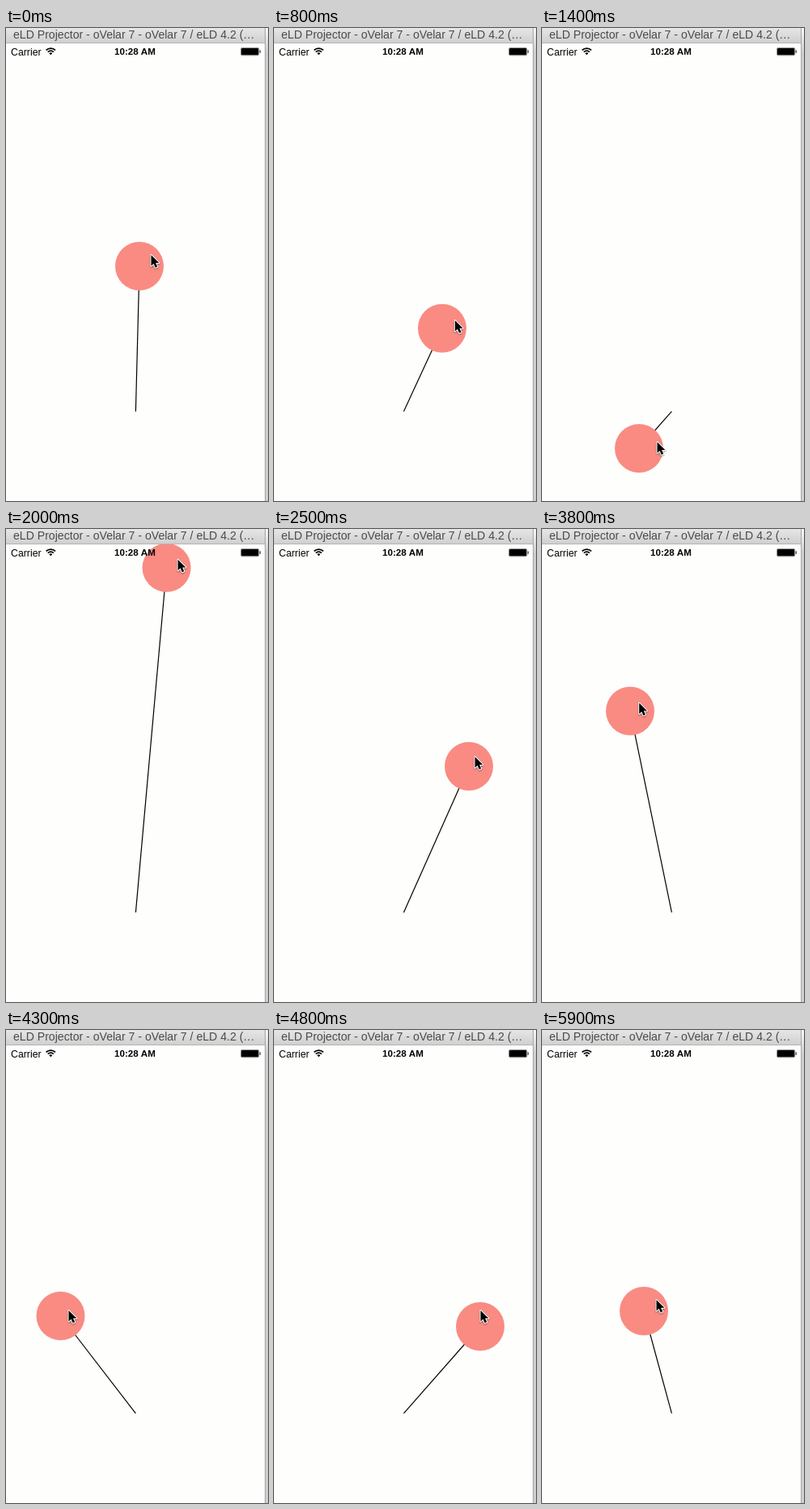
Write an HTML page with a canvas that moves like this. It is 324x584 px and loops after 6 s.

```html
<!DOCTYPE html>
<html lang="en">
<head>
<meta charset="utf-8">
<title>Ball on a spring</title>
<style>
html, body { margin: 0; width: 100%; height: 100%; overflow: hidden; background: #fefefd; }
canvas { display: block; }
</style>
</head>
<body>
<canvas id="stage" width="324" height="584"></canvas>
<script>
const ctx = document.getElementById('stage').getContext('2d');
const TICK = 100, TICKS = 60;
const ANCHOR = { x: 160.4, y: 473.4 };
const SANS = '"Liberation Sans", Arial, sans-serif';

// Each drag starts at a ball position, with the pointer held at an offset (grip).
// On the way to the next one the ball is pulled up by lift and sideways by sway.
const DRAGS = [
  { tick: 0, ball: [165, 294], grip: [14, -14], lift: 270, sway: 40 },
  { tick: 7, ball: [180, 362], grip: [15, -10], lift: 0, sway: 40 },
  { tick: 14, ball: [120, 519], grip: [22, -8], lift: 350, sway: -35 },
  { tick: 25, ball: [241, 293], grip: [7, -12], lift: 150, sway: -75 },
  { tick: 33, ball: [110.5, 111], grip: [17.5, -22], lift: 0, sway: 0 },
  { tick: 35, ball: [101, 193], grip: [11, -11], lift: 0, sway: 0 },
  { tick: 36, ball: [101, 193], grip: [11, -11], lift: 0, sway: 15 },
  { tick: 43, ball: [67.5, 353], grip: [9.5, -7], lift: 300, sway: -20 },
  { tick: 48, ball: [255, 366], grip: [0, -20], lift: 290, sway: 25 },
  { tick: 57, ball: [126, 347], grip: [-70, -333], lift: 0, sway: 0 },
  { tick: 59, ball: [126, 347], grip: [15, -14], lift: 0, sway: 0 }
];

const mix = (a, b, u) => a.map((v, i) => v + (b[i] - v) * u);

function poseAt(tick) {
  const i = DRAGS.findLastIndex(drag => drag.tick <= tick);
  const from = DRAGS[i], to = DRAGS[i + 1] ?? { ...DRAGS[0], tick: TICKS };
  const u = (tick - from.tick) / (to.tick - from.tick);
  const ease = u * u * (3 - 2 * u);
  const [baseX, baseY] = mix(from.ball, to.ball, ease);
  const [gripX, gripY] = mix(from.grip, to.grip, ease);
  const x = baseX + from.sway * Math.sin(2 * Math.PI * u);
  const y = baseY - from.lift * Math.sin(Math.PI * u) ** 2;
  return { ball: { x, y }, pointer: { x: x + gripX, y: y + gripY } };
}

function rect(color, x, y, w, h) {
  ctx.fillStyle = color;
  ctx.fillRect(x, y, w, h);
}

function text(str, x, y, font, color) {
  ctx.font = `${font} ${SANS}`;
  ctx.fillStyle = color;
  ctx.fillText(str, x, y);
}

function fade(height, top, bottom) {
  const gradient = ctx.createLinearGradient(0, 0, 0, height);
  gradient.addColorStop(0, top);
  gradient.addColorStop(1, bottom);
  return gradient;
}

function drawBall({ x, y }) {
  ctx.strokeStyle = '#000';
  ctx.lineWidth = 1.2;
  ctx.beginPath();
  ctx.moveTo(ANCHOR.x, ANCHOR.y);
  ctx.lineTo(x, y);
  ctx.stroke();
  ctx.fillStyle = '#f98b83';
  ctx.beginPath();
  ctx.arc(x, y, 30, 0, Math.PI * 2);
  ctx.fill();
}

function drawWifi(x, y) {
  const from = -Math.PI * 0.75, to = -Math.PI * 0.25;
  ctx.strokeStyle = ctx.fillStyle = '#000';
  ctx.lineWidth = 1.7;
  for (const r of [5, 8.1]) {
    ctx.beginPath();
    ctx.arc(x, y, r, from, to);
    ctx.stroke();
  }
  ctx.beginPath();
  ctx.moveTo(x, y);
  ctx.arc(x, y, 2.8, from, to);
  ctx.fill();
}

function drawBattery() {
  ctx.strokeStyle = '#777';
  ctx.lineWidth = 0.8;
  ctx.beginPath();
  ctx.roundRect(290.4, 24.4, 22.4, 9.4, 1.8);
  ctx.stroke();
  ctx.fillStyle = '#000';
  ctx.beginPath();
  ctx.roundRect(291, 25, 21.2, 8.2, 1);
  ctx.fill();
  rect('#333', 313.6, 27.4, 1.2, 3.4);
}

function drawStatusBar() {
  text('Carrier', 6, 33.5, '12.3px', '#000');
  drawWifi(55.3, 33.2);
  text('10:28 AM', 134, 33.2, 'bold 11.6px', '#000');
  drawBattery();
}

function drawWindow() {
  rect(fade(18, '#e6e6e6', '#d0d0d0'), 0, 0, 320, 18);
  rect('#b4b4b4', 0, 18, 320, 1);
  text('eLD Projector - oVelar 7 - oVelar 7 / eLD 4.2 (…', 9, 13, '14.1px', '#4b4b4b');
  rect('#a6a6a6', 320, 0, 1, 584);
  rect(fade(30, '#f8f8f8', '#cfcfcf'), 321, 0, 3, 584);
}

function drawPointer({ x, y }) {
  ctx.save();
  ctx.translate(x + 0.5, y + 0.2);
  const arrow = new Path2D('M0 0V13.6L3.1 10.7L5.2 15.6L7.7 14.6L5.6 9.8H9.8Z');
  ctx.lineJoin = 'round';
  ctx.lineWidth = 2;
  ctx.strokeStyle = '#fff';
  ctx.shadowColor = 'rgba(0,0,0,.4)';
  ctx.shadowBlur = 2;
  ctx.shadowOffsetY = 1;
  ctx.stroke(arrow);
  ctx.shadowColor = 'transparent';
  ctx.fillStyle = '#000';
  ctx.fill(arrow);
  ctx.restore();
}

function draw(time) {
  const { ball, pointer } = poseAt(Math.floor(time / TICK) % TICKS);
  rect('#fefefd', 0, 0, 324, 584);
  drawBall(ball);
  drawStatusBar();
  drawWindow();
  drawPointer(pointer);
}

let start;
function loop(now) {
  start ??= now;
  draw(now - start);
  requestAnimationFrame(loop);
}
draw(0);
requestAnimationFrame(loop);
</script>
</body>
</html>
```
